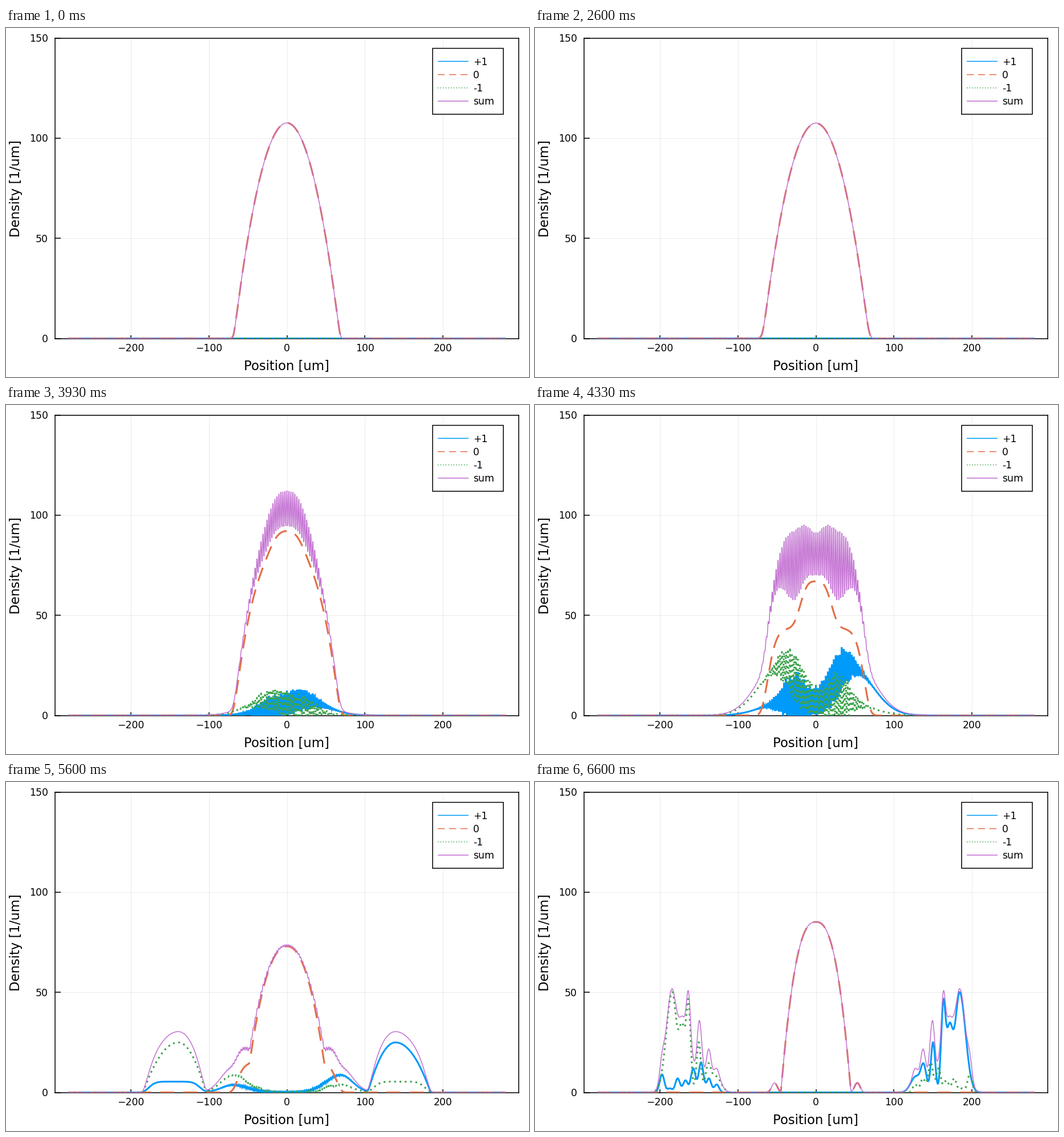
Animation of 917 by 611 pixels, one loop 6.67 s. Source, as a matplotlib script:

```python
import numpy as np
import matplotlib.pyplot as plt
from matplotlib.animation import FuncAnimation
from matplotlib.patches import Rectangle

W, H = 917, 611
L, R, T, B = 86, 899, 18, 543.5
THIN, THICK = 1.53, 3.1
BLUE, ORANGE, GREEN, PURPLE = "#009afa", "#e36f47", "#3ea44e", "#c371d2"
DASH, DOT = (0, (8, 5)), (0, (1, 2))
FRAMES = 100
STAGES = [52, 64, 71, 83, 98]
ECHO = 0.245  # share of the packet moving the other way

plt.rcParams["font.family"] = "DejaVu Sans"
x = np.linspace(-280, 280, 2049)
fringe = np.cos(2 * np.pi * x / 2.55)
# uneven spikes on the fringe tips of the thick lines
spiky = fringe * (1 + 0.6 * np.random.default_rng(4).random(x.size) * fringe ** 8)


# ---- profile shapes -------------------------------------------------------

def bump(centre, height, left, right=None, power=2):
    """Gaussian with separate side widths; a high power flattens the top."""
    def f(u):
        d = u - centre
        s = np.where(d < 0, left, right or left)
        return height * np.exp(-0.5 * np.abs(d / s) ** power)
    return f


def dome(centre, height, left, right=None, power=2, soft=1):
    """Thomas-Fermi profile with softened edges."""
    def f(u):
        d = u - centre
        edge = np.where(d < 0, left, right or left)
        return soft * np.logaddexp(0, height * (1 - np.abs(d / edge) ** power) / soft)
    return f


def total(*shapes):
    return lambda u: sum(f(u) for f in shapes)


def scaled(f, k):
    return lambda u: k * f(u)


def cloud(t):
    soft = 3.2 + 1.8 * (np.clip(t, 1, 45) - 1) / 38
    return dome(0, 107.7, 68.2, soft=soft)


loss = bump(0, 7.2, 20)

# each track: (centre, shape) per stage
core = [(0, f) for f in (
    total(cloud(STAGES[0]), scaled(loss, -1)),
    total(bump(0, 43.5, 58, power=9), bump(0, 23.5, 18.1, power=3.3)),
    total(bump(0, 25, 62.9, power=12), bump(0, 50, 28.6, power=4)),
    total(bump(0, 15, 60.1, power=11), dome(0, 58, 47.8, power=2.2)),
    total(dome(0, 85.2, 44.8, power=2.5), bump(-53, 4.8, 3.5), bump(53, 4.8, 3.5)),
)]

inner = [
    (-22, bump(-22, 0.4, 13, 18)),
    (-22, bump(-22, 4.5, 13, 18)),
    (0, bump(0, 4.1, 20)),
    (69, total(bump(69, 8.7, 19, 15), bump(0, 0.15, 25))),
    (138, total(bump(150, 25, 2.8), bump(138, 12, 3.5), bump(128, 8, 6.5))),
]
outer = [
    (5, bump(5, 1.2, 25)),
    (44, bump(44, 24.5, 22, 28)),
    (82, bump(82, 24.5, 19, 25)),
    (139, dome(139, 25, 35, 45)),
    (177, total(bump(184, 50, 5.5, 7.5), bump(171, 31, 4), bump(163, 42, 2.8))),
]


def comb(first, heights):
    return total(*(bump(first + 10 * k, h, 3) for k, h in enumerate(heights)))


def echo(keys, k=ECHO):
    return [(c, scaled(f, k)) for c, f in keys]


inner_back = echo(inner[:3]) + echo(inner[3:4], 0.43) + [(138, comb(127, [4, 7, 15]))]
outer_back = echo(outer[:3]) + [(139, bump(144, 5.4, 30.3, power=6)),
                                (177, comb(157, [12, 6, 7, 2, 9]))]


# ---- time -----------------------------------------------------------------

def gain(t):
    return np.exp(0.3 * min(t - STAGES[0], 0))


def track(keys, t, u):
    """Blend neighbouring shapes while their centre travels."""
    t = np.clip(t, STAGES[0], STAGES[-1])
    j = min(np.searchsorted(STAGES, t, side="right") - 1, len(STAGES) - 2)
    s = (t - STAGES[j]) / (STAGES[j + 1] - STAGES[j])
    w = np.expm1(2.2 * s) / np.expm1(2.2) if j == 0 else s
    (c0, f0), (c1, f1) = keys[j], keys[j + 1]
    c = c0 + (c1 - c0) * s
    return (1 - w) * f0(u - c + c0) + w * f1(u - c + c1)


def densities(t):
    if t <= STAGES[0]:
        zero = cloud(t)(x) - gain(t) * loss(x)
    else:
        zero = track(core, t, x)
    zero = np.maximum(zero, 0)
    fwd = gain(t) * (track(inner, t, x) + track(outer, t, x))
    back = gain(t) * (track(inner_back, t, -x) + track(outer_back, t, -x))
    mean, swing = fwd + back, 2 * np.sqrt(fwd * back)
    plus = np.maximum(mean + swing * spiky, 0)
    both = mean + mean[::-1] + (swing + swing[::-1]) * fringe
    return plus, zero, plus[::-1], zero + both


# ---- stage ----------------------------------------------------------------

fig = plt.figure(figsize=(W / 72, H / 72), dpi=72, facecolor="white")
ax = fig.add_axes([L / W, 1 - B / H, (R - L) / W, (B - T) / H])
ax.set(xlim=(-296.8, 296.8), ylim=(0, 150),
       xticks=range(-200, 201, 100), yticks=range(0, 151, 50))
ax.set_axisbelow(True)
ax.grid(color="black", alpha=0.1, lw=0.76)
ax.tick_params(direction="in", width=THIN, labelbottom=False, labelleft=False)
ax.tick_params(axis="x", length=6.3)
ax.tick_params(axis="y", length=9.8)
for spine in ax.spines.values():
    spine.set(linewidth=THIN, zorder=1)

# overlay in pixel coordinates for text and legend
page = fig.add_axes([0, 0, 1, 1])
page.set(xlim=(0, W), ylim=(H, 0))
page.axis("off")


def put(px, py, s, size=17.3, ha="center", **kw):
    page.text(px, py, s, size=size, ha=ha, va="baseline", **kw)


for v in range(-200, 201, 100):
    put(L + (v + 296.8) / 593.6 * (R - L), 566.5, str(v).replace("-", "\u2212"))
for v in range(0, 151, 50):
    put(73.6, B - v / 150 * (B - T) + 6.2, str(v), ha="right")
put(492.4, 598.5, "Position [um]", 22.8)
put(24, 280.7, "Density [1/um]", 22.8, rotation=90, rotation_mode="anchor")

SERIES = [("+1", BLUE, "-", THICK), ("0", ORANGE, DASH, THICK),
          ("-1", GREEN, DOT, THICK), ("sum", PURPLE, "-", THIN)]

page.add_patch(Rectangle((748, 35.6), 124, 115.4, fc="white", ec="black",
                         lw=THIN, snap=False))
lines = []
for n, (name, color, style, width) in enumerate(SERIES):
    y = 58.4 + 23.2 * n
    page.plot([757, 811], [y, y], color=color, ls=style, lw=THIN,
              solid_capstyle="butt", snap=False)
    put(819, y + 6.2, name, ha="left")
    lines += ax.plot(x, 0 * x, color=color, ls=style, lw=width, zorder=3 + n,
                     solid_joinstyle="miter", solid_capstyle="butt")


def update(i):
    for line, y in zip(lines, densities(i)):
        line.set_ydata(y)
    return lines


anim = FuncAnimation(fig, update, frames=FRAMES, interval=66.7, repeat=True,
                     repeat_delay=0, blit=False)
plt.show()
```
